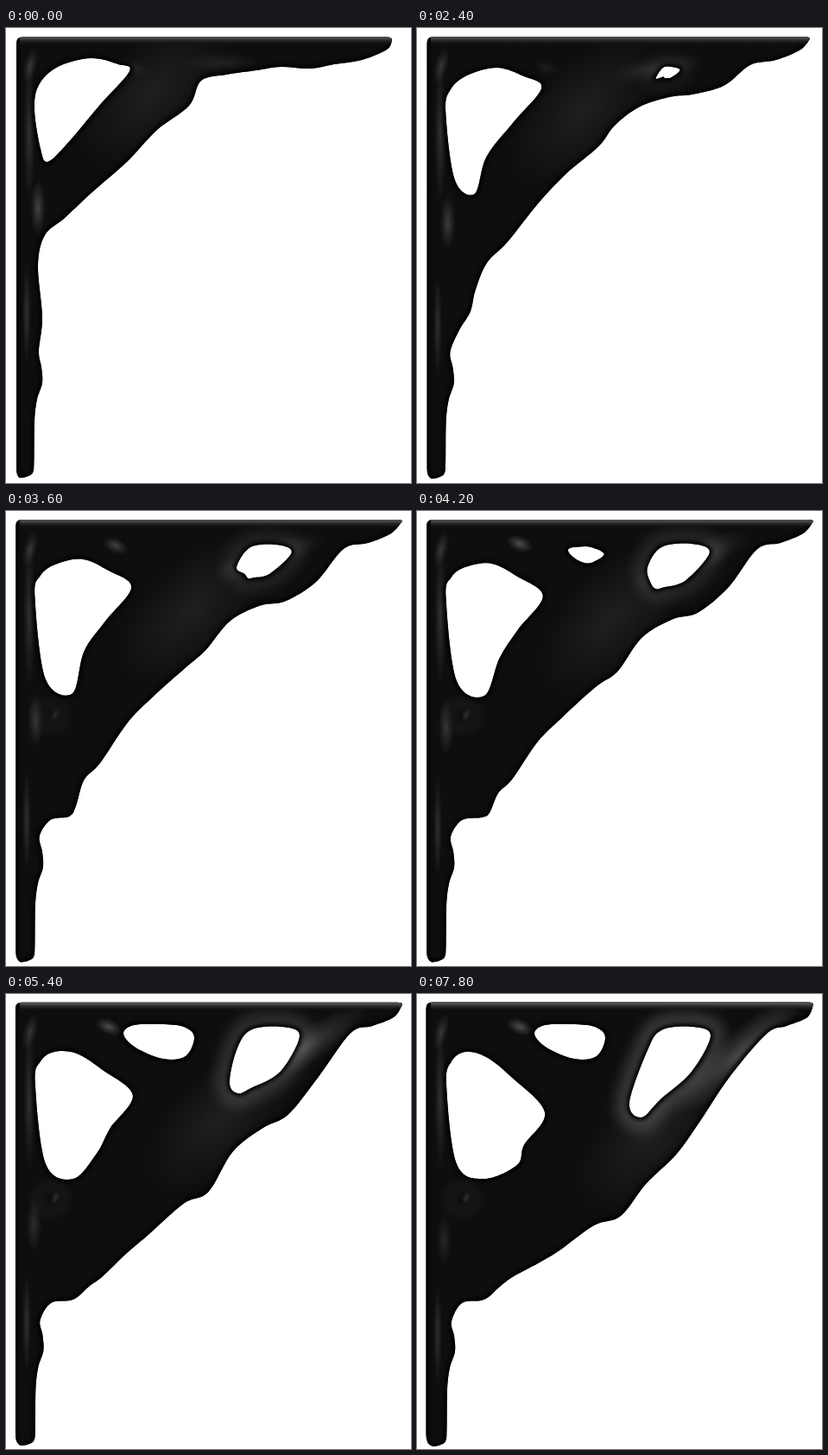
Write an HTML page with a canvas that moves like this. It is 469 by 527 pixels and loops after 8000 ms.

```html
<!DOCTYPE html>
<html lang="en">
<head>
<meta charset="utf-8">
<title>Bracket</title>
<style>
html, body { margin: 0; width: 100%; height: 100%; overflow: hidden; background: #fff; }
canvas { display: block; }
</style>
</head>
<body>
<canvas id="stage" width="469" height="527"></canvas>
<script>
const ctx = document.getElementById('stage').getContext('2d');
const LOOP = 8000, STEP = 300, END = 7800;

// Moving points: start x,y, final x,y, pace
const edge = [
  [447,14, 459,12, 2], [441,25, 452,27, 1], [412,37, 428,37, 1], [380,42, 405,46, 1],
  [352,47, 362,96, 1.4], [318,45, 328,147, 1.2], [290,49, 300,186, 1], [255,54, 265,220, 1],
  [226,61, 236,257, 1.1], [212,90, 205,268, 1.1], [175,118, 165,297, 1.15], [140,155, 140,312, 1.2],
  [100,190, 112,327, 1.45], [68,220, 97,338, 1.5], [45,240, 84,350, 1.8], [37,275, 74,355, 2],
  [42,335, 52,358, 2], [38,374, 40,379, 1]
];
const leftHole = [
  [33,95, 34,105, 1], [38,66, 40,78, 1.5], [60,45, 56,67, 1.5], [98,35, 80,73, 1.15], [130,42, 108,95, 1.1],
  [143,50, 148,137, 1], [108,90, 124,175, 1], [70,135, 116,198, 1], [48,155, 78,214, 1.9], [40,140, 46,197, 1.9]
];
// Holes that open from one seed point: final x,y, pace
const rightHole = { start: 1200, seed: [289, 50], rim: [
  [246,126, 1], [267,65, 3], [283,42, 3], [318,38, 2.2], [340,48, 2], [318,90, 1.5], [282,122, 1.15], [260,143, 1]
] };
const topHole = { start: 3600, seed: [195, 48], rim: [
  [136,46, 2.7], [148,36, 3], [180,35, 3.5], [206,38, 4], [218,50, 6], [208,72, 3.5], [182,75, 3], [150,62, 2.7]
] };

const mix = (a, b, u) => a + (b - a) * u;
const clamp = u => Math.max(0, Math.min(1, u));
const smooth = u => (u = clamp(u), u * u * (3 - 2 * u));

const move = (rows, u) => rows.map(([x0, y0, x1, y1, pace]) => {
  const e = smooth(u * pace);
  return [mix(x0, x1, e), mix(y0, y1, e)];
});

function open({ start, seed, rim }, t) {
  const u = (t - start) / (END - start);
  return u > 0 ? move(rim.map(([x, y, pace]) => [...seed, x, y, pace]), u) : null;
}

// Catmull-Rom curve through the points
function spline(path, pts, closed) {
  const n = pts.length;
  const p = i => pts[closed ? (i + n) % n : Math.max(0, Math.min(n - 1, i))];
  if (closed) path.moveTo(...pts[0]); else path.lineTo(...pts[0]);
  for (let i = 0; i < (closed ? n : n - 1); i++) {
    const [a, b, c, d] = [p(i - 1), p(i), p(i + 1), p(i + 2)];
    path.bezierCurveTo(b[0] + (c[0] - a[0]) / 6, b[1] + (c[1] - a[1]) / 6,
      c[0] - (d[0] - b[0]) / 6, c[1] - (d[1] - b[1]) / 6, c[0], c[1]);
  }
  if (closed) path.closePath();
}

function outline(u) {
  const path = new Path2D(), x = 12 - 1.5 * u, y = 10.5 - u;
  const front = move(edge, u), [tipX, tipY] = front[0];
  const leg = [[41,393], [42,411], [36,430], [33,455], [32.5,500], [31,515], [23,520], [16,521]]
    .map(([a, b]) => [a + 2 * u, b + 3 * u]);
  path.moveTo(x, y + 7);
  path.quadraticCurveTo(x, y, x + 7, y);
  path.lineTo(tipX - 6, y);
  path.quadraticCurveTo(tipX, y, tipX, tipY);
  spline(path, front.concat(leg));
  path.quadraticCurveTo(x, 519 + 3 * u, x, 510);
  path.closePath();
  return path;
}

function glow(x, y, rx, ry, turn, alpha, tone = 255) {
  const g = ctx.createRadialGradient(0, 0, 0, 0, 0, 1);
  for (const [stop, part] of [[0, 1], [.5, .45], [1, 0]])
    g.addColorStop(stop, `rgba(${tone},${tone},${tone},${alpha * part})`);
  ctx.save();
  ctx.translate(x, y);
  ctx.rotate(turn);
  ctx.scale(rx, ry);
  ctx.fillStyle = g;
  ctx.fillRect(-1, -1, 2, 2);
  ctx.restore();
}

function rim(path, color, width, blur) {
  ctx.filter = `blur(${blur}px)`;
  ctx.strokeStyle = color;
  ctx.lineWidth = width;
  ctx.stroke(path);
  ctx.filter = 'none';
}

function draw(t) {
  const u = t / END, e = smooth(u), late = clamp((t - 2700) / 1200);
  const path = outline(u), right = open(rightHole, t), top = open(topHole, t);
  const ring = new Path2D();
  if (right) spline(ring, right, true);
  for (const hole of [move(leftHole, u), right, top]) if (hole) spline(path, hole, true);

  ctx.fillStyle = '#fff';
  ctx.fillRect(0, 0, 469, 527);
  ctx.save();
  ctx.clip(path, 'evenodd');
  ctx.fillStyle = '#0e0e0e';
  ctx.fillRect(0, 0, 469, 527);

  rim(ring, `rgba(255,255,255,${.16 * e})`, 34, 7);
  glow(mix(170, 270, e), mix(75, 165, e), 110, 55, -Math.PI / 4, .075);
  glow(mix(250, 372, e), mix(40, 70, e), mix(45, 100, e), mix(12, 24, e), -.75 * e, mix(.08, .24, e));
  glow(mix(37, 31, e), mix(208, 285, e), 9, 32, 0, mix(.22, .1, e));
  glow(27, 120, 7, 85, 0, .15);
  glow(28, 44, 8, 22, .25, .16);
  glow(mix(150, 119, late), mix(46, 38, late), 16, 9, .4, mix(.06, .26, late));
  glow(24, mix(330, 395, e), 5, 60, 0, .14);
  rim(path, '#000', 6, 2);

  // pocket under the left opening
  glow(52, 237, 27, 25, 0, .14 * late);
  glow(52, 237, 24, 22, 0, .8 * late, 0);
  glow(57, 236, 5, 8, .5, .14 * late);

  const sheen = ctx.createLinearGradient(0, 9, 0, 20);
  sheen.addColorStop(0, '#666');
  sheen.addColorStop(.4, '#343434');
  sheen.addColorStop(1, 'rgba(14,14,14,0)');
  ctx.fillStyle = sheen;
  ctx.fillRect(16, 9, 450, 11);
  ctx.restore();
}

let shown = -1;
function tick(now) {
  const step = Math.floor(now % LOOP / STEP);
  if (step !== shown) draw((shown = step) * STEP);
  requestAnimationFrame(tick);
}
tick(performance.now());
</script>
</body>
</html>
```
